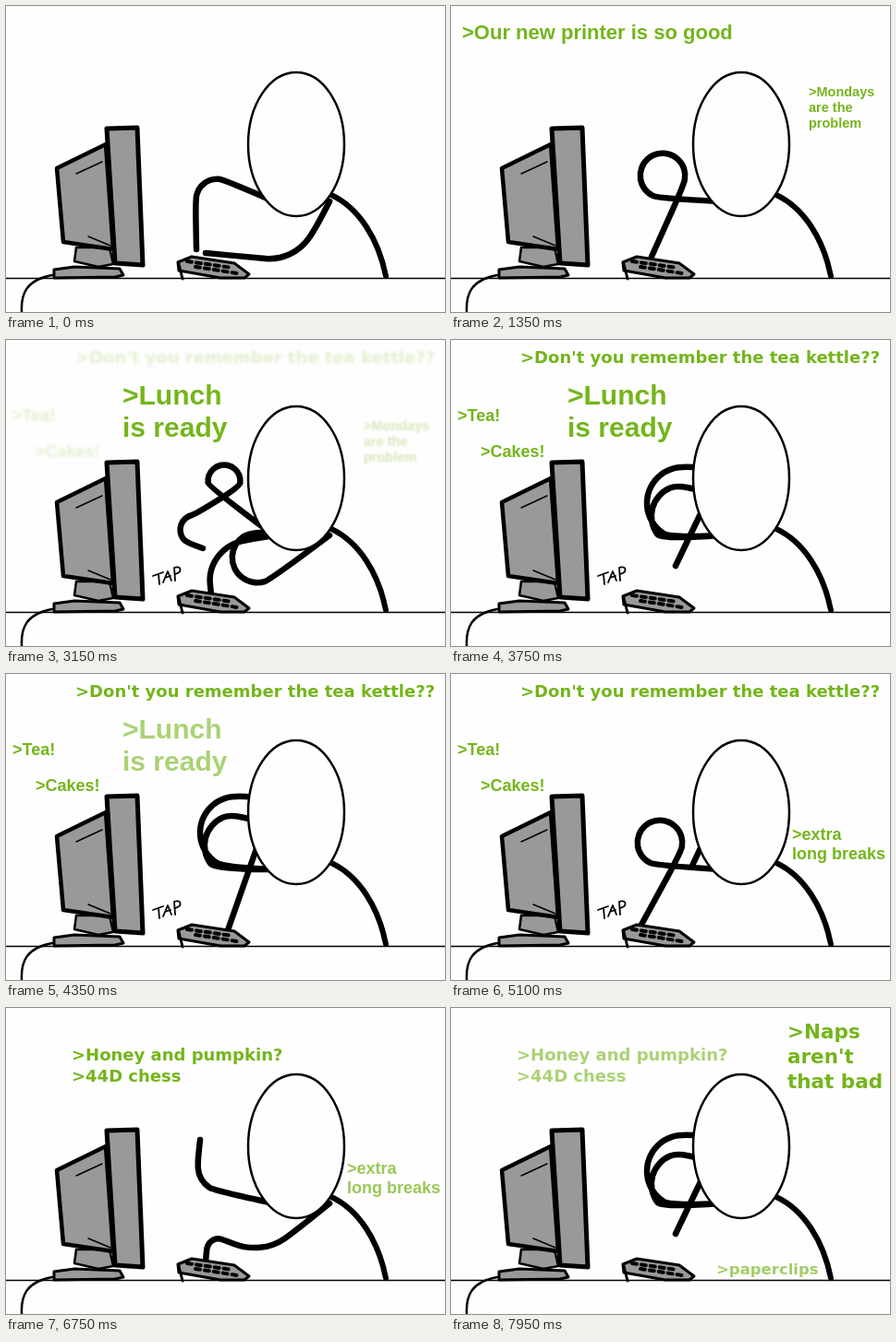
An HTML page for the animation above (8000 ms loop, 475 px wide and 332 px high).

```html
<!DOCTYPE html>
<html lang="en">
<head>
<meta charset="utf-8">
<title>Busy typist</title>
<style>
  html, body { margin: 0; width: 100%; height: 100%; overflow: hidden; background: #fefefe; }
  svg { display: block; width: 100vw; height: 100vh; }
  .ink { fill: none; stroke: #000; stroke-linecap: round; stroke-linejoin: round; }
  .grey { fill: #999; stroke: #000; stroke-linejoin: round; }
  #captions text { fill: #74b51b; font-weight: bold; }
  .sans { font-family: "Liberation Sans", Arial, sans-serif; }
  .wide { font-family: "DejaVu Sans", Verdana, sans-serif; }
</style>
</head>
<body>
<svg viewBox="0 0 475 332" preserveAspectRatio="none">
  <!-- desk -->
  <path class="ink" stroke-width="1.6" d="M0 295.5H475"/>
  <path class="ink" stroke-width="2.5" d="M17 332C16 312 22 297 50 292"/>

  <!-- monitor -->
  <path class="grey" stroke-width="2.5" d="M76 262L74 277L100 283L116 280L112 262Z"/>
  <path class="grey" stroke-width="3" d="M52 286L74 283L123 285L127 292L118 294L52 295Z"/>
  <path class="grey" stroke-width="4.5" d="M55 176L108 150L116 264L62 256Z"/>
  <path class="grey" stroke-width="5" d="M109 133L142 132L148 281L118 279Z"/>
  <path class="ink" stroke-width="1.5" d="M76 182L104 169M89 250L113 260"/>

  <!-- typist -->
  <path class="ink" stroke-width="6" d="M352 205C382 219 403 253 411 293"/>
  <path id="arms" class="ink" stroke-width="6.5"/>
  <ellipse cx="314" cy="150" rx="52" ry="78" fill="#fefefe" stroke="#000" stroke-width="2.5"/>

  <!-- keyboard -->
  <path class="grey" stroke-width="3" d="M186 278L201 272L247 279L263 291L258 295L232 295L187 287Z"/>
  <path class="ink" stroke-width="4" stroke-dasharray="5 5" d="M196 277L245 284M205 283L250 290"/>
  <path class="ink" stroke-width="3" d="M187 280L191 296"/>

  <path id="tap" class="ink" stroke-width="1.8" d="M159 256L170 252M165 254L166 265M170 263L175 251L179 261M172 258L178 256M183 261L182 247C190 244 191 252 183 254"/>
  <g id="captions"></g>
</svg>

<script>
const LOOP = 8000, STEP = 150, FADE_IN = 300, FADE_OUT = 750;
const CHIN = [290, 212], SHOULDER = [350, 212];

// Points along a circular bend, angles in degrees clockwise from the right.
function bend(cx, cy, r, from, to) {
  const n = Math.ceil(Math.abs(to - from) / 30);
  return Array.from({ length: n + 1 }, (_, i) => {
    const a = (from + (to - from) * i / n) * Math.PI / 180;
    return [cx + r * Math.cos(a), cy + r * Math.sin(a)];
  });
}

// Smooth path through the bends of one arm, from its root to its hand.
function arm(root, bends, hand) {
  const pts = [...bends.flatMap(b => bend(...b)), hand];
  let d = `M${root}`;
  pts.slice(0, -1).forEach(([x, y], i) => {
    const [u, v] = pts[i + 1];
    d += `Q${x} ${y} ${(x + u) / 2} ${(y + v) / 2}`;
  });
  return d + `L${hand}`;
}

const curl = (x, y, r, hand) => arm(CHIN, [[x, y, r, 100, 385]], hand);
const hug = (x, y, hand) =>
  arm(CHIN, [[x, y, 40, 110, 265]], [x + 24, y - 38]) +
  arm(CHIN, [[x - 1, y + 14, 34, 130, 260]], [x + 18, y - 14]) +
  arm([275, 178], [], hand);

const raised = arm(CHIN, [[228, 210, 23, 290, 180]], [206, 264]) +
  arm(SHOULDER, [[285, 222, 54, 20, 110]], [216, 268]);
const curlIn = curl(229, 184, 25, [217, 272]);
const curlOut = curl(226, 183, 25, [206, 272]) + arm([275, 178], [], [261, 208]);
const tangle =
  arm(CHIN, [[236, 153, 18, 160, 380], [205, 206, 17, 270, 130]], [213, 226]) +
  arm(SHOULDER, [[272, 236, 28, 60, 250]], [290, 208]) +
  arm(CHIN, [[265, 262, 46, 270, 190]], [222, 276]);
const hugDown = hug(249, 172, [240, 278]);
const hugUp = hug(251, 177, [243, 245]);
const wave = arm(CHIN, [[235, 172, 28, 110, 190]], [210, 143]) +
  arm(SHOULDER, [[270, 205, 57, 40, 100], [230, 263, 13, 280, 180]], [216, 276]);

const dance = [raised, hugDown, hugUp, wave, raised, curlIn, curlOut,
  tangle, hugDown, curlIn, curlOut, hugUp, wave, tangle];

const captions = [
  { lines: [">Our new printer is so good"], x: 12, y: 36, size: 22, from: 150, to: 1350 },
  { lines: [">Mondays", "are the", "problem"], x: 387, y: 98, size: 14.5, from: 1050, to: 2625 },
  { lines: [">Lunch", "is ready"], x: 126, y: 70, size: 30, from: 2100, to: 4050 },
  { lines: [">Don't you remember the tea kettle??"], x: 75, y: 25, size: 18, wide: true, from: 3090, to: 5400 },
  { lines: [">Tea!"], x: 7, y: 88, size: 18, from: 3090, to: 5400 },
  { lines: [">Cakes!"], x: 32, y: 127, size: 18, from: 3090, to: 5400 },
  { lines: [">extra", "long breaks"], x: 369, y: 180, size: 18, from: 4500, to: 6550 },
  { lines: [">Honey and pumpkin?", ">44D chess"], x: 71, y: 57, size: 18, wide: true, from: 5850, to: 7650 },
  { lines: [">Naps", "aren't", "that bad"], x: 364, y: 33, size: 21.5, wide: true, from: 6900, to: LOOP },
  { lines: [">paperclips"], x: 287, y: 289, size: 16.5, wide: true, from: 7750, to: LOOP }
];

const NS = "http://www.w3.org/2000/svg";
const arms = document.getElementById("arms");
const tap = document.getElementById("tap");
const clamp = v => Math.max(0, Math.min(1, v));

function add(parent, tag, attrs = {}) {
  const el = document.createElementNS(NS, tag);
  for (const key in attrs) el.setAttribute(key, attrs[key]);
  return parent.appendChild(el);
}

for (const c of captions) {
  c.group = add(document.getElementById("captions"), "g");
  const lead = c.size * (c.wide ? 1.26 : 1.17);
  c.lines.forEach((line, i) => {
    add(c.group, "text", {
      x: c.x, y: c.y + i * lead, "font-size": c.size, class: c.wide ? "wide" : "sans"
    }).textContent = line;
  });
}

function draw(time) {
  const step = Math.floor((time % LOOP) / STEP);
  const t = step * STEP;
  arms.setAttribute("d", dance[step % dance.length]);
  tap.style.display = t >= 2250 && t < 5850 ? "" : "none";
  for (const { group, from, to } of captions) {
    const alpha = Math.min(clamp((t - from) / FADE_IN), clamp(1 - (t - to) / FADE_OUT));
    group.style.opacity = alpha;
    group.style.filter = alpha < 1 ? `blur(${1.8 * (1 - alpha)}px)` : "none";
  }
}

const start = performance.now();
function tick() {
  draw(performance.now() - start);
  requestAnimationFrame(tick);
}
tick();
</script>
</body>
</html>
```
